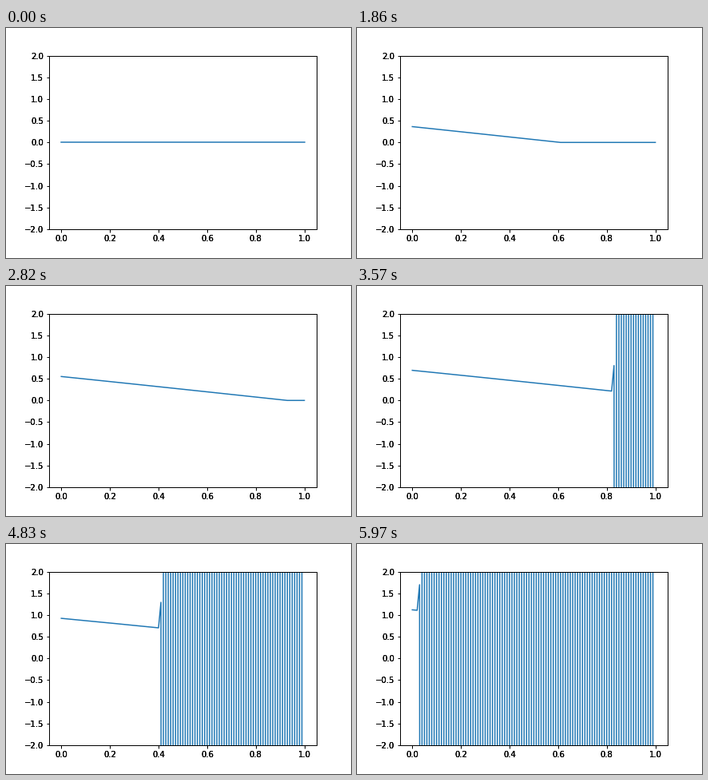
Animation of 432 by 288 pixels, one loop 6000 ms. Source, as a matplotlib script:

```python
import numpy as np
import matplotlib.pyplot as plt
from matplotlib.animation import FuncAnimation

FRAMES, INTERVAL = 200, 30
CELLS = 100
DX = 1 / CELLS
LIMIT = 3.0  # just outside the visible range

x = np.linspace(0, 1, CELLS + 1)


def curve(step):
    """Wave driven at the left end; it turns unstable once it hits the right."""
    s = DX * max(step - 1, 0) - x
    u = 2 * np.sin(0.3 * np.where(s > 1e-9, s, 0))

    head = 2 * CELLS + 2 - step  # leftmost unstable grid point
    if head > CELLS:
        return x, u
    u[head] += 0.594
    xs, ys = x[:head + 1], u[:head + 1]
    if head == CELLS:
        return xs, ys

    # The oscillation grows so fast that each cell shows as a vertical stroke.
    strokes = np.repeat(x[head + 1:CELLS], 2)
    k = np.arange(len(strokes) + 1)
    sides = np.where((k + 1) // 2 % 2 == 0, -LIMIT, LIMIT)
    sides = np.concatenate([[-LIMIT], sides[:-1]])
    return (np.concatenate([xs, [x[head] + 0.06 * DX], strokes]),
            np.concatenate([ys, sides]))


def darken_labels(ax, copies=2):
    """Overprint the tick labels so that their edges look heavier."""
    tx, vax, hax = ax.get_xaxis_text1_transform(7)
    ty, vay, hay = ax.get_yaxis_text1_transform(7)
    for _ in range(copies):
        for v in ax.get_xticks():
            ax.text(v, 0, f"{v:.1f}", transform=tx, va=vax, ha=hax)
        for v in ax.get_yticks():
            label = f"{v:.1f}".replace("-", "\u2212")
            ax.text(0, v, label, transform=ty, va=vay, ha=hay)


plt.rcParams.update({
    "font.family": "DejaVu Sans",
    "font.size": 10,
    "axes.linewidth": 1,
    "xtick.major.width": 1,
    "ytick.major.width": 1,
})

fig, ax = plt.subplots(figsize=(6, 4), dpi=72, facecolor="white")
fig.subplots_adjust(left=0.125, right=0.9, bottom=0.125, top=0.88)
ax.set_xlim(-0.05, 1.05)
ax.set_ylim(-2, 2)
ax.set_xticks(np.arange(6) * 0.2)
ax.set_yticks(np.arange(-4, 5) * 0.5)
darken_labels(ax)
line, = ax.plot([], [], color="#1f77b4", lw=1.5)


def update(step):
    line.set_data(*curve(step))
    return line,


anim = FuncAnimation(fig, update, frames=FRAMES, interval=INTERVAL,
                     init_func=lambda: update(0), repeat=True, repeat_delay=0)
plt.show()
```
